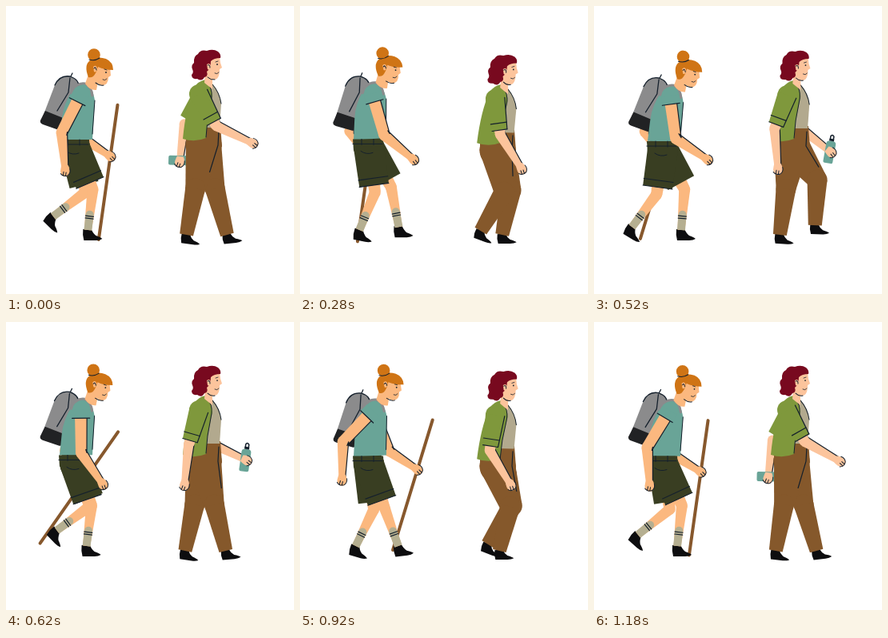
Animation, 360 px wide and 360 px high, one loop 1.2 s. Source, as an HTML page with a canvas:

```html
<!DOCTYPE html>
<html lang="en">
<head>
<meta charset="utf-8">
<title>Two walkers</title>
<style>
html, body { margin: 0; width: 100%; height: 100%; overflow: hidden; background: #fff; }
canvas { display: block; width: 360px; height: 360px; }
</style>
</head>
<body>
<canvas width="360" height="360"></canvas>
<script>
const c = document.querySelector('canvas').getContext('2d');
const LOOP = 1200;
const INK = '#15202c', TAN = '#fbb87f', PEACH = '#fcc49c', TEAL = '#69a497', SHORTS = '#393e22', SOCK = '#b5af91',
  GINGER = '#cf7415', WOOD = '#87582d', PANTS = '#85582b', GREEN = '#7f983c', SAND = '#b2a98e', MAROON = '#78091f';

// Gait: the foot lands at `down`, slides from `front` to `back` until `up`, then swings forward
const hikerGait = { down: 900, up: 500, front: 124, back: 47, ground: 280, drag: .4, lift: 24, late: 1, toe: 28, flick: 36 };
const walkerGait = { down: 1170, up: 760, front: 279, back: 212, ground: 286, drag: 0, lift: 18, late: 2, toe: 12, flick: 18 };

const wave = (t, peak, period = LOOP) => Math.cos((t - peak) / period * 2 * Math.PI);
const mix = (a, b, k) => [a[0] + (b[0] - a[0]) * k, a[1] + (b[1] - a[1]) * k];
const wrap = t => (t % LOOP + LOOP) % LOOP;
const smooth = k => (k = Math.max(0, Math.min(1, k)), k * k * (3 - 2 * k));

function foot(t, g) {
  const stance = wrap(g.up - g.down), age = wrap(t - g.down), span = g.back - g.front;
  if (age < stance) {
    const s = age / stance;
    return {
      ankle: [g.front + span * s * (1 - g.drag + g.drag * s), g.ground],
      turn: g.toe * smooth(2 * s - 1) - 8 * Math.max(0, 1 - 6 * s)
    };
  }
  const k = (age - stance) / (LOOP - stance);
  return {
    ankle: [g.back - span * smooth(k), g.ground - g.lift * Math.sin(Math.PI * k ** g.late)],
    turn: g.toe * (1 - k) - 8 * k + g.flick * Math.sin(Math.PI * k)
  };
}

function fill(color, d) {
  c.fillStyle = color;
  c.fill(new Path2D(d));
}

function line(d, width = 1.2, color = INK) {
  c.strokeStyle = color;
  c.lineWidth = width;
  c.stroke(new Path2D(d));
}

function dot(color, x, y, r) {
  c.fillStyle = color;
  c.beginPath();
  c.arc(x, y, r, 0, 7);
  c.fill();
}

function placed([x, y], angle, draw) {
  c.save();
  c.translate(x, y);
  c.rotate(angle);
  draw();
  c.restore();
}

const radians = degrees => degrees * Math.PI / 180;

function leaning(pivot, angle, rise, draw) {
  placed([pivot[0], pivot[1] + rise], angle, () => {
    c.translate(-pivot[0], -pivot[1]);
    draw();
  });
}

// Middle joint of a two-part limb; side 1 bends forward, -1 backward
function joint(a, b, l1, l2, side) {
  const x = b[0] - a[0], y = b[1] - a[1], d = Math.hypot(x, y);
  if (d >= l1 + l2) return mix(a, b, l1 / (l1 + l2));
  const k = (l1 * l1 - l2 * l2 + d * d) / (2 * d);
  const h = side * Math.sqrt(Math.max(0, l1 * l1 - k * k));
  return [a[0] + (x * k + y * h) / d, a[1] + (y * k - x * h) / d];
}

// Tapered limb with round joints and a flat end
function limb(color, points, widths, outlined) {
  let front = '';
  for (let i = 0; i + 1 < points.length; i++) {
    const [ax, ay] = points[i], [bx, by] = points[i + 1];
    const d = Math.hypot(bx - ax, by - ay) || 1, nx = (by - ay) / d / 2, ny = (ax - bx) / d / 2;
    const v = widths[i], w = widths[i + 1];
    dot(color, ax, ay, v / 2);
    fill(color, `M${ax + nx * v} ${ay + ny * v}L${bx + nx * w} ${by + ny * w}` +
      `L${bx - nx * w} ${by - ny * w}L${ax - nx * v} ${ay - ny * v}Z`);
    front += `${i ? 'L' : 'M'}${ax + nx * v} ${ay + ny * v}L${bx + nx * w} ${by + ny * w}`;
  }
  if (outlined) line(front);
}

// Line straight across a limb running from a to b
function across(a, b, k, width) {
  const [x, y] = mix(a, b, k), d = Math.hypot(b[0] - a[0], b[1] - a[1]);
  const nx = (b[1] - a[1]) / d * width / 2, ny = (a[0] - b[0]) / d * width / 2;
  line(`M${x - nx} ${y - ny}L${x + nx} ${y + ny}`);
}

function hand(skin, elbow, palm) {
  placed(palm, Math.atan2(palm[1] - elbow[1], palm[0] - elbow[0]), () => {
    fill(skin, 'M-7 -4Q-2 -7 4 -5Q8 -3 7 1Q6 6 0 6Q-5 5 -7 4Z');
    line('M-2 -6Q3 -7 6 -3Q8 3 3 6M2 -1L6 0M1 2L5 3', 1);
  });
}

function shoe({ ankle, turn }, height) {
  placed(ankle, radians(turn), () => {
    c.scale(1, height);
    fill('#0d0d0f', 'M-6 -1L4 -2Q6 4 10 7Q16 9 18 11Q15 13 10 13L-5 13Q-7 6 -6 -1Z');
  });
}

function hikerLeg(t, hip, near) {
  const step = foot(t, hikerGait), ankle = step.ankle;
  const knee = joint(hip, ankle, 57, 51, 1), cuff = mix(hip, knee, .84), sock = mix(knee, ankle, .62);
  shoe(step, 1);
  limb(TAN, [mix(hip, knee, .6), knee, ankle], [17, 14, 9]);
  fill(SOCK, '');
  limb(SOCK, [sock, ankle], [10, 10]);
  across(sock, ankle, .1, 10);
  across(sock, ankle, .25, 10);
  limb(SHORTS, [hip, cuff], [38, 37]);
  if (near) {
    across(hip, cuff, .82, 37);
    across(hip, cuff, 1, 37);
  }
}

function hikerHead() {
  fill(TAN, 'M105 80L99 97Q105 106 113 105L115 95Z');
  fill(TAN, 'M109 70L130 76L131 87L128 89Q128 99 120 99Q112 98 108 86Z');
  dot(GINGER, 110, 61, 7.8);
  fill(GINGER, 'M103 89Q97 74 105 68Q114 62 125 66Q134 70 134 80Q123 80 115 76Q113 84 109 88Q106 90 103 89Z');
  line('M104 67Q111 69 117 65', 1);
  fill(TAN, 'M109 76Q113 73 114 78Q113 84 110 82Z');
  line('M110 78Q112 75 113 80M112 96Q117 100 122 99', 1);
  line('M121 92Q124 94 126 91M123 79L126 80', .8);
  dot(INK, 125, 83, .9);
}

function hiker(t) {
  const dx = 4.6 * wave(t, 520, LOOP / 2) - 3.1, dy = -2.8 * wave(t, 150, LOOP / 2);
  const hip = [86, 177 + dy], shoulder = [94 + dx * .53, 110 + dy];

  const reach = wave(t, 990), grip = [115 + 34 * reach, 190 - 3 * reach - 3 * reach ** 2];
  const tilt = radians(8 + 36 * Math.max(0, wave(t, 720)) ** 2);
  const farElbow = joint(shoulder, grip, 55, 42, -1);
  placed(grip, tilt, () => line('M0 -65V105', 4, WOOD));
  limb(TAN, [shoulder, farElbow, grip], [14, 13, 8], true);
  hand(TAN, farElbow, grip);

  hikerLeg(t + LOOP / 2, hip, false);
  hikerLeg(t, hip, true);

  leaning([86, 168], dx / 108, dy, () => {
    fill('#8b8b8c', 'M43 146L61 99Q67 86 80 88Q93 92 91 104L70 155Z');
    fill('#212224', 'M49 131L74 141L71 153Q70 156 66 155L46 148Q42 146 43 143Z');
    line('M61 99Q67 86 80 88Q92 92 91 102M81 88L83 84M80 90L78 108L64 131', 1.3);
    fill(TEAL, 'M99 96Q108 100 111 118L108 167L67 167L70 140Q72 122 83 106Q89 97 99 96Z');
    line('M111 118L108 160', 1);
    line('M82 109Q88 95 99 97Q107 101 108 112', 3, '#8b8b8c');
    hikerHead();
  });

  leaning([0, 0], 0, dy, () => {
    fill(SHORTS, 'M66 167H104L105 181H67Z');
    line('M66 173H103M77 167V174M92 167V174M76 182Q83 187 91 184', 1);
  });

  const swing = wave(t, 400), palm = [100 + 52 * swing, 208 - 18 * swing ** 2 - 5 * swing];
  const elbow = joint(shoulder, palm, 54, 48, -1), sleeve = mix(shoulder, elbow, .2);
  limb(TAN, [sleeve, elbow, palm], [15, 14, 8], true);
  hand(TAN, elbow, palm);
  limb(TEAL, [shoulder, sleeve], [21, 22]);
  across(shoulder, sleeve, 1, 22);
}

function walkerLeg(t, hip) {
  const step = foot(t, walkerGait), knee = joint(hip, step.ankle, 53, 57, 1);
  shoe(step, .85);
  limb(PANTS, [hip, knee, step.ankle], [45, 25, 17]);
  return knee;
}

function walkerHead() {
  fill(PEACH, 'M249 82L248 96L258 104L258 90Z');
  fill(PEACH, 'M250 66L267 63L268 71L270 77L267 79Q267 92 260 92Q253 92 250 84Z');
  fill(MAROON, 'M240 60Q243 54 251 56Q259 53 265 57Q269 60 268 65Q260 65 256 69Q256 78 251 82' +
    'Q253 88 248 89Q245 95 239 91Q232 92 232 86Q235 83 233 79Q231 74 235 71Q234 63 240 60Z');
  fill(PEACH, 'M251 73Q255 70 256 75Q255 81 252 79Z');
  line('M252 74Q255 72 255 77M252 89Q256 93 261 92', 1);
  line('M261 84Q264 86 266 83M262 70L265 69', .8);
  dot(INK, 264, 73, .9);
}

function drawBottle() {
  fill(TEAL, 'M-8 -10Q-8 -14 -4 -14H0Q4 -14 4 -10V12Q4 14 2 14H-6Q-8 14 -8 12Z');
  fill(INK, 'M-5 -17H1V-14H-5Z');
  line('M-4 -17V-20Q-2 -23 0 -20V-17', 1.5);
}

function walker(t) {
  const sway = 1 - wave(t, 0, LOOP / 2), dx = 1.5 * sway, dy = 3 * sway;
  const hip = [247, 174 + dy], shoulder = [241 + dx, 110 + dy];

  const carry = wave(t, 610);
  const grip = [259 + 42 * carry, 204 - 9 * carry ** 2 - 22 * Math.max(0, carry) ** 4];
  const farShoulder = [shoulder[0] + 5, shoulder[1]], farElbow = joint(farShoulder, grip, 44, 48, -1);
  limb(PEACH, [farElbow, grip], [12, 8], true);
  limb(GREEN, [farShoulder, mix(farShoulder, farElbow, .85)], [24, 19]);
  placed(grip, radians(38 - 42 * carry + 12 * carry ** 2), drawBottle);
  hand(PEACH, farElbow, grip);

  walkerLeg(t, hip);
  const knee = walkerLeg(t + LOOP / 2, hip), seam = mix(hip, knee, .62);
  leaning([0, 0], 0, dy, () => fill(PANTS, 'M246 149H268L270 176H225V164Z'));
  line(`M${hip[0] + 19} ${hip[1] - 18}L${hip[0] + 18} ${hip[1]}L${seam[0] + 14} ${seam[1]}`);

  leaning([247, 172], dx / 105, dy, () => {
    fill(SAND, 'M252 96L258 97Q268 109 269 122L267 152H247Z');
    line('M258 98Q267 108 269 122', 1);
    fill(GREEN, 'M249 92Q240 94 235 102Q225 125 221 166Q236 171 250 165L252 142L258 112Q257 100 249 92Z');
    line('M251 95Q258 102 257 114L252 142L250 164', 1);
    walkerHead();
  });

  const swing = wave(t, 30), palm = [266 + 43 * swing, 204 - 34 * Math.max(0, swing) ** 4];
  const elbow = joint(shoulder, palm, 45, 51, -1), cuff = mix(shoulder, elbow, .88);
  limb(PEACH, [elbow, palm], [13, 8], true);
  limb(PEACH, [cuff, elbow], [13, 13]);
  hand(PEACH, elbow, palm);
  limb(GREEN, [shoulder, cuff], [24, 19], true);
  across(shoulder, cuff, .78, 20);
  across(shoulder, cuff, 1, 19);
}

function frame(now) {
  const t = Math.floor(now / 20) * 20 % LOOP;
  c.fillStyle = '#fff';
  c.fillRect(0, 0, 360, 360);
  c.lineCap = c.lineJoin = 'round';
  hiker(t);
  walker(t);
  requestAnimationFrame(frame);
}
frame(0);
</script>
</body>
</html>
```
